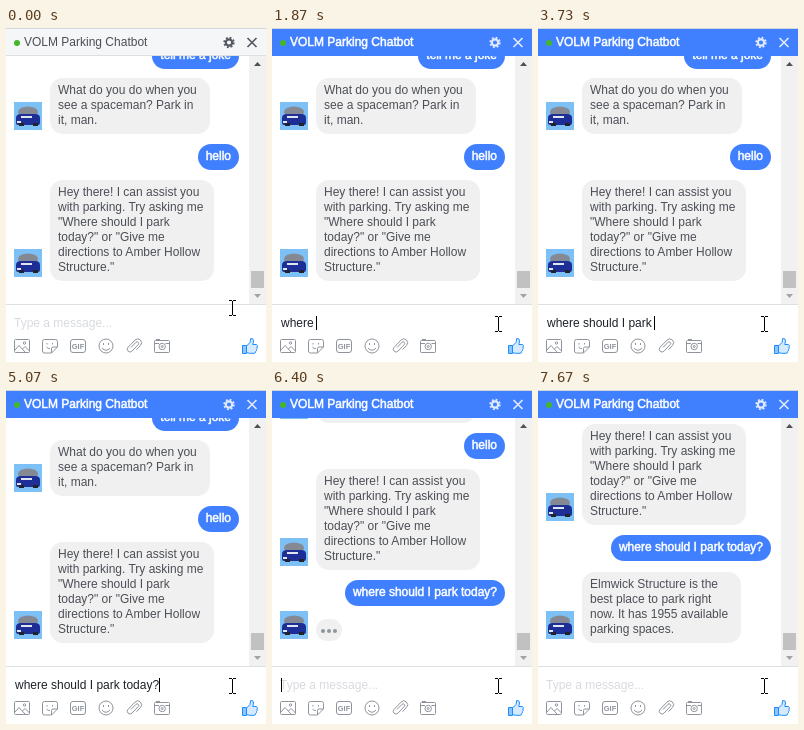
An HTML page that plays this animation: 260x334 px, repeating every 8000 ms.

```html
<!DOCTYPE html>
<html lang="en">
<head>
<meta charset="utf-8">
<title>Parking chat</title>
<style>
  html, body { margin: 0; width: 100%; height: 100%; overflow: hidden; background: #fff; }
  #stage {
    position: relative; width: 260px; height: 334px; overflow: hidden; background: #fff;
    font: 12px/15px "Liberation Sans", Arial, sans-serif; color: #4b4f56;
  }
  #stage div, #stage svg { position: absolute; box-sizing: border-box; }

  #head { left: 0; top: 0; width: 260px; height: 28px; border-top: 1px solid #d3d6db;
    border-bottom: 1px solid #dddfe2; background: #f5f6f7; color: #4b4f56; --tool: #555a62; }
  #head.active { background: #4080ff; border-bottom-color: #4080ff; color: #fff; --tool: #dfe9ff; }
  #title { left: 18px; top: 6px; white-space: pre; }
  #head.active #title, .me { -webkit-text-stroke: .5px #fff; }

  #view { left: 0; top: 28px; width: 243px; height: 248px; overflow: hidden; }
  #list { left: 0; top: -28px; width: 243px; height: 400px; }
  .msg { padding: 5px 8px 6px; border-radius: 13px; background: #f1f0f0; white-space: pre; }
  .bot { left: 44px; }
  .me { right: 10px; background: #4080ff; color: #fff; }
  .pic { left: 8px; width: 28px; height: 28px; }
  .dot { top: 10px; width: 4px; height: 4px; border-radius: 50%; background: #8d949e; }

  #bar { left: 243px; top: 28px; width: 17px; height: 248px; background: #f1f1f1; }
  #thumb { left: 2px; top: 215px; width: 13px; height: 17px; background: #c1c1c1; }
  #line { left: 0; top: 276px; width: 260px; height: 1px; background: #dddfe2; }

  #hint, #field { top: 288px; white-space: pre; }
  #hint { left: 8px; color: #d8dadf; }
  #field { left: 9px; color: #1d2129; }
  #caret { top: 288px; width: 1px; height: 14px; background: #000; }
  #icons { left: 0; top: 0; }
</style>
</head>
<body>
<div id="stage">
  <div id="head">
    <div id="title">VOLM Parking Chatbot</div>
    <svg width="260" height="27" fill="none" stroke="var(--tool)" style="left:0;top:-1px">
      <circle cx="11" cy="15" r="3" fill="#42b72a" stroke="none"/>
      <circle cx="223" cy="14.500" r="3.200" stroke-width="2.200"/>
      <circle cx="223" cy="14.500" r="4.800" stroke-width="1.800" stroke-dasharray="1.885"/>
      <path d="M241.500 10l9 9m0-9l-9 9" stroke-width="1.700"/>
    </svg>
  </div>

  <div id="view"><div id="list"></div></div>
  <div id="bar">
    <div id="thumb"></div>
    <svg width="17" height="248" style="left:0;top:0">
      <path d="M5 10l3.500-4 3.500 4z" fill="#505050"/>
      <path d="M5 238l3.500 4 3.500-4z" fill="#a3a3a3"/>
    </svg>
  </div>

  <div id="line"></div>
  <div id="hint">Type a message...</div>
  <div id="field"></div>
  <div id="caret"></div>

  <svg id="icons" width="260" height="334" fill="none" stroke="#8f949c">
    <g>
      <rect x="8.500" y="311.500" width="15" height="13" rx="1"/>
      <path d="M9 322l4-4.500 6 6.500M16.500 321l2.500-2.500 4.500 4.500"/>
      <circle cx="18.500" cy="315" r="1.200"/>
    </g>
    <g>
      <path d="M38.500 311.500h11a2 2 0 0 1 2 2v5.500l-6 6h-7a2 2 0 0 1-2-2v-9.500a2 2 0 0 1 2-2zM51 319h-4a1.500 1.500 0 0 0-1.500 1.500V325"/>
      <path d="M41 315v1.500m5.500-1.500v1.500M40.500 319q1.500 2 3.500 1.500"/>
    </g>
    <rect x="64.500" y="311.500" width="15" height="13" rx="2.500"/>
    <text x="72" y="321" text-anchor="middle" font-family="Liberation Sans, Arial, sans-serif" font-size="7.500" font-weight="700" fill="#8f949c" stroke="none">GIF</text>
    <g>
      <circle cx="100" cy="318" r="7"/>
      <path d="M97.500 315v2m5-2v2M96 320q4 4.500 8 0"/>
    </g>
    <path d="M125 319.500l5-5.200a1.500 1.500 0 0 1 2.300 2.200l-6.300 6.600a2.700 2.700 0 0 1-4-3.700l7-7.300a3.800 3.800 0 0 1 5.500 5.300l-4 4.300"/>
    <g>
      <rect x="148.500" y="312.500" width="15" height="12" rx="1"/>
      <path d="M150 311.500h4M149 315.500h4M159.500 315.500h4"/>
      <circle cx="156.200" cy="318.500" r="3.200"/>
      <circle cx="156.200" cy="318.500" r="1"/>
    </g>
    <g stroke="#1a8cff" fill="#d6eaff" stroke-linejoin="round">
      <path d="M236.500 317.500h4v8h-4z" fill="#8cc5ff"/>
      <path d="M240.500 318l3.500-3.500.7-4q2.800-.5 2.800 2.500l-.7 3.500h3.700q1.500.8.500 2.500.7 1.500-.5 2.500.3 1.500-.8 2 0 1.800-1.700 1.800h-4.500l-3-.8z"/>
    </g>
    <path id="cursor" d="M223 .5h3m1 0h3M226.500 1v14M223 15.500h3m1 0h3" stroke="#000"/>
  </svg>
</div>

<script>
const LOOP = 8000;
const QUESTION = 'where should I park today?';
const FOCUS = 400, SENT = 5930, TYPING = 6330, REPLY = 7600;

// Time of each keystroke in QUESTION
const KEYS = [1270, 1400, 1530, 1670, 1730, 1870, 2070, 2130, 2270, 2330, 2470, 2670, 2730,
  3000, 3130, 3200, 3330, 3470, 3600, 3730, 4130, 4200, 4470, 4470, 4600, 5070];
const CARET = [[0, 0], [FOCUS, 1], [930, 0], [1270, 1], [6470, 0], [7000, 1], [REPLY, 0]];
const SCROLL = [[0, 0], [SENT, 36], [TYPING, 73], [REPLY, 118]];
const CURSOR_Y = [[0, 272], [70, 279], [200, 286], [600, 288]];

const PIC = `<svg width="28" height="28">
  <path fill="#7cc0f5" d="M0 0h28v28H0z"/>
  <ellipse cx="14" cy="10" rx="10" ry="5.500" fill="#858994"/>
  <path fill="#1d2f96" d="M2 16q0-4 5-4h14q5 0 5 4v5q0 2-2 2H4q-2 0-2-2z"/>
  <path fill="#dfe6f2" d="M7 14h11v2H7zm-4 5h4v2H3z"/>
  <path fill="#20222c" d="M5 21h5v3H5zm14 0h5v3h-5z"/>
</svg>`;

const $ = id => document.getElementById(id);
const list = $('list');

function add(cls, html, top, width) {
  const el = document.createElement('div');
  el.className = cls;
  el.innerHTML = html;
  el.style.top = top + 'px';
  if (width) el.style.width = width + 'px';
  list.append(el);
  return el;
}
const bot = (top, width, ...lines) => add('msg bot', lines.join('<br>'), top, width);
const me = (top, text) => add('msg me', text, top);
const pic = top => add('pic', PIC, top);
const show = (el, on) => { el.style.visibility = on ? 'visible' : 'hidden'; };
const at = (steps, t) => steps.reduce((v, [time, next]) => t >= time ? next : v, 0);

me(15, 'tell me a joke');
bot(50, 160, 'What do you do when you', 'see a spaceman? Park in', 'it, man.');
pic(74);
me(116, 'hello');
bot(152, 164, 'Hey there! I can assist you', 'with parking. Try asking me',
  '"Where should I park', 'today?" or "Give me', 'directions to Amber Hollow', 'Structure."');
pic(221);
const sent = me(263, QUESTION);
const typing = bot(302, 26);
typing.style.height = '22px';
const dots = [5, 11, 17].map(x => {
  const dot = document.createElement('div');
  dot.className = 'dot';
  dot.style.left = x + 'px';
  typing.append(dot);
  return dot;
});
const typingPic = pic(294);
const reply = bot(300, 159, 'Elmwick Structure is the', 'best place to park right',
  'now. It has 1955 available', 'parking spaces.');
const replyPic = pic(339);

// Rise to 28 % of a 1.5 s cycle, back down by 44 %
function hop(ms) {
  const p = ms / 1500;
  if (p <= 0 || p >= .44) return 0;
  return -5 * (p < .28 ? p / .28 : (.44 - p) / .16);
}

function draw(t) {
  const text = t < SENT ? QUESTION.slice(0, KEYS.filter(k => k <= t).length) : '';

  $('head').classList.toggle('active', t >= FOCUS);
  show($('hint'), !text);

  if ($('field').textContent !== text) $('field').textContent = text;
  $('caret').style.left = 9 + $('field').offsetWidth - text.endsWith(' ') + 'px';
  show($('caret'), at(CARET, t));

  list.style.transform = `translateY(${-at(SCROLL, t)}px)`;
  $('cursor').setAttribute('transform', `translate(0 ${at(CURSOR_Y, t)})`);

  const waiting = t >= TYPING && t < REPLY;
  show(sent, t >= SENT);
  show(typing, waiting);
  show(typingPic, waiting);
  show(reply, t >= REPLY);
  show(replyPic, t >= REPLY);
  dots.forEach((dot, i) => {
    dot.style.transform = `translateY(${hop(t - TYPING - 200 - 100 * i)}px)`;
  });
}

const start = performance.now();
function tick() {
  draw((performance.now() - start) % LOOP);
  requestAnimationFrame(tick);
}
tick();
</script>
</body>
</html>
```
